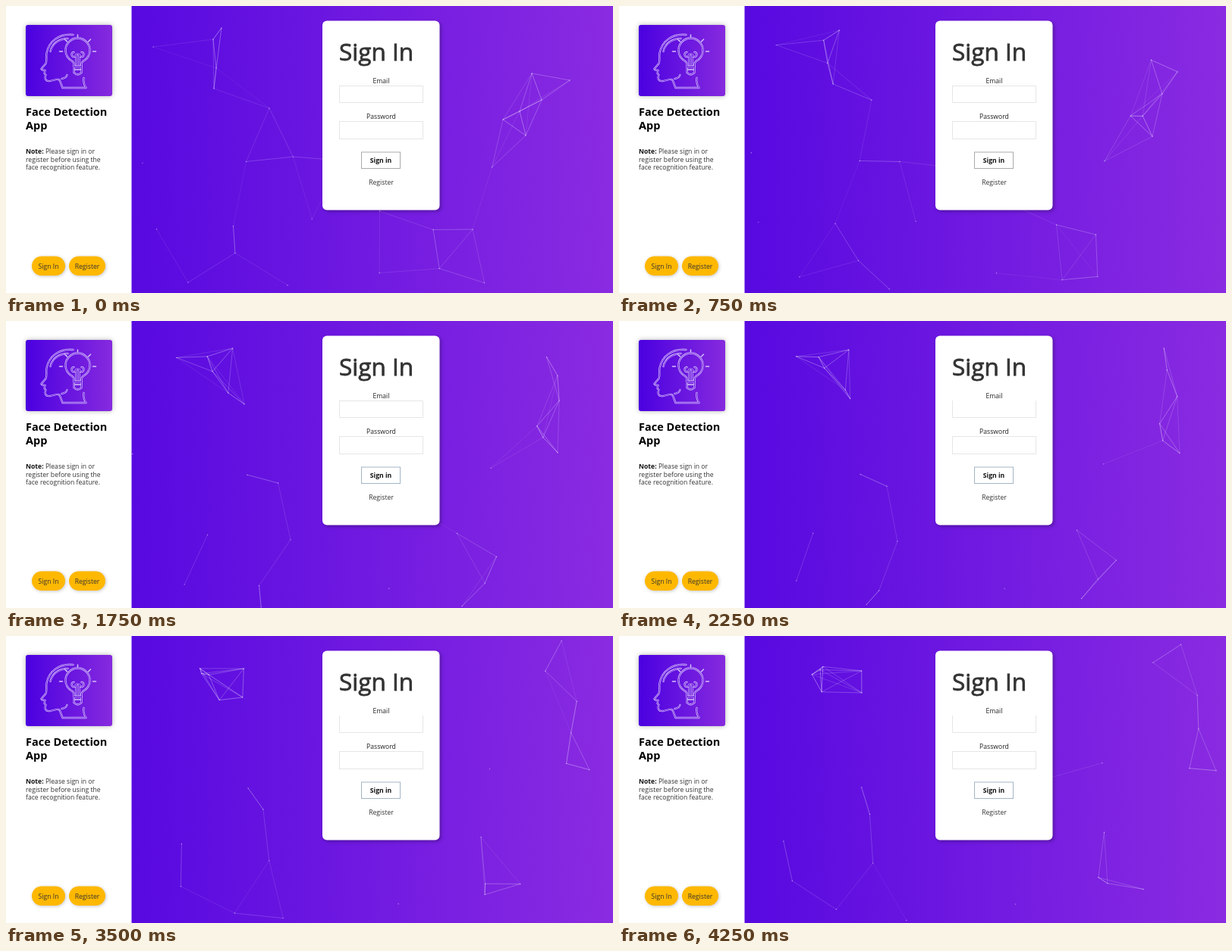
An HTML page with a canvas for the animation above (4.5 s loop, 800x379 px).

```html
<!DOCTYPE html>
<html lang="en">
<head>
<meta charset="utf-8">
<title>Face Detection App</title>
<style>
  html, body { margin: 0; width: 100%; height: 100%; overflow: hidden; background: #fff; }
  canvas, svg { position: absolute; left: 0; top: 0; width: 800px; height: 379px; display: block; }
  text { font-family: "Open Sans", "Noto Sans", sans-serif; font-size: 8.65px; fill: #333; }
  .mid { text-anchor: middle; }
  .dark { fill: #222; }
  .bold { font-weight: 700; fill: #111; }
  .title { font-size: 14.5px; font-weight: 700; fill: #000; }
  .head { font-size: 31.5px; stroke: #333; stroke-width: .8px; }
  .field { fill: none; stroke: #e6e6e6; }
  .pill { fill: #ffb800; filter: drop-shadow(1px 1px 2px rgba(0,0,0,.22)); }
  .card { fill: #fff; filter: drop-shadow(2px 2px 2px rgba(0,0,0,.28)); }
  .pic { filter: drop-shadow(0 0 3px rgba(0,0,0,.3)); }
  .icon { fill: none; stroke-linecap: round; stroke-linejoin: round; }
</style>
</head>
<body>
<canvas id="net" width="800" height="379"></canvas>
<svg viewBox="0 0 800 379">
  <defs>
    <linearGradient id="violet">
      <stop offset="0" stop-color="#4a00e0"/>
      <stop offset="1" stop-color="#862ade"/>
    </linearGradient>
    <g id="lines">
      <path d="M89 38C70 36 57 47 54 62C53 68 55 72 53 76L47 83Q48 85 52 85L51 89L53 91L52 94Q52 100 59 99L67 97Q71 96 72 100L75 108H106Q102 102 103 95"/>
      <path d="M59 60Q63 44 82 43"/>
      <path d="M81 91Q80 95 74 96"/>
      <path d="M90 80V76Q89 73 85 71A16 16 0 1 1 105 71Q101 73 100 76V80Z"/>
      <path d="M90 80H100V88Q95 93 90 88Z"/>
      <path d="M93 78V64M97 78V64M93 64H97M93 64A3 3 0 1 1 90 61M97 64A3 3 0 1 0 100 61"/>
    </g>
  </defs>

  <rect width="165.5" height="379" fill="#fff"/>
  <rect class="pic" x="26" y="25" width="114" height="94" rx="3" fill="url(#violet)"/>
  <g class="icon" transform="translate(-.5 0)">
    <use href="#lines" stroke="#d3c0fa" stroke-width="2.3"/>
    <use href="#lines" stroke="#6811de" stroke-width=".9"/>
    <path d="M95 38V41M78 44L81 47M112 44L109 47M71 60H75M115 60H119M91 84H99" stroke="#d3c0fa" stroke-width="1.5"/>
  </g>
  <text class="title" x="26" y="145">Face Detection</text>
  <text class="title" x="26" y="163">App</text>
  <text x="26" y="195"><tspan class="bold">Note:</tspan> Please sign in or</text>
  <text x="26" y="205.7">register before using the</text>
  <text x="26" y="216.3">face recognition feature.</text>
  <rect class="pill" x="34" y="330.5" width="44" height="25.5" rx="12.75"/>
  <rect class="pill" x="83" y="330.5" width="48" height="25.5" rx="12.75"/>
  <text class="mid" x="56" y="346.5">Sign In</text>
  <text class="mid" x="107" y="346.5">Register</text>

  <rect class="card" x="417" y="19.5" width="154.5" height="250" rx="6"/>
  <text class="head" x="439" y="72">Sign In</text>
  <text class="mid dark" x="494.5" y="101.5">Email</text>
  <path class="field" d="M439.5 105V127.5H549.5V105"/>
  <path class="field" id="top" d="M439 105.5H550"/>
  <text class="mid dark" x="494.5" y="149">Password</text>
  <rect class="field" x="439.5" y="152.5" width="110" height="23"/>
  <rect id="button" x="468.5" y="193" width="51" height="21.5" fill="#fff"/>
  <text class="mid bold" x="494" y="207.3">Sign in</text>
  <text class="mid" x="494.5" y="235.7">Register</text>
</svg>
<script>
const W = 800, H = 379, STEP = 250, LOOP = 4500, REACH = 89;
const ctx = document.getElementById("net").getContext("2d");
const topLine = document.getElementById("top");
const button = document.getElementById("button");

let seed = 11;
const rand = () => (seed = (seed * 16807) % 2147483647) / 2147483647;
const spread = size => (rand() - .5) * size;

// The two upper clusters: x, y, and travel per step
const dots = [
  [194, 54, 4.4, -.8], [273, 44, -1.1, .4], [284, 29, 2.1, 1],
  [274, 109, 2.7, -2], [347, 135, -4.7, -3.6], [277, 82, -.7, -2.2],
  [706, 124, 3.3, -2.7], [693, 89, 2.8, -5.9], [743, 98, -2.3, -3.7],
  [685, 171, 6, .4], [655, 150, 6.4, -1.6], [677, 139, 4.4, 2.1]
];

// The lower field drifts freely from a loose grid
for (let i = 0; i < 18; i++) {
  const x = 210 + 85 * (i % 6), y = 210 + 70 * Math.floor(i / 6);
  dots.push([x + spread(60), y + spread(50), spread(10), spread(10)]);
}

const bounce = y => y < 0 ? -y : y > H ? 2 * H - y : y;

const backdrop = ctx.createLinearGradient(0, 0, W, 0);
backdrop.addColorStop(0, "#4a00e0");
backdrop.addColorStop(1, "#8a2be1");

function link([x, y], [u, v]) {
  const near = 1 - Math.hypot(u - x, v - y) / REACH;
  if (near < 0) return;
  ctx.strokeStyle = `rgba(255,255,255,${.07 + .53 * near})`;
  ctx.beginPath();
  ctx.moveTo(x, y);
  ctx.lineTo(u, v);
  ctx.stroke();
}

function draw(n) {
  ctx.fillStyle = backdrop;
  ctx.fillRect(0, 0, W, H);
  ctx.lineWidth = .8;
  const pts = dots.map(([x, y, vx, vy]) => [x + vx * n, bounce(y + vy * n)]);
  pts.forEach((p, i) => {
    pts.slice(i + 1).forEach(q => link(p, q));
    ctx.fillStyle = "rgba(255,255,255,.5)";
    ctx.beginPath();
    ctx.arc(p[0], p[1], .7, 0, 2 * Math.PI);
    ctx.fill();
  });
  topLine.style.visibility = n < 9 ? "visible" : "hidden";
  button.style.stroke = n < 5 ? "#aaa" : "#a3b5c6";
}

let start, last = -1;
function tick(now) {
  start ??= now;
  const n = Math.floor((now - start) % LOOP / STEP);
  if (n !== last) draw(last = n);
  requestAnimationFrame(tick);
}
draw(0);
requestAnimationFrame(tick);
</script>
</body>
</html>
```
